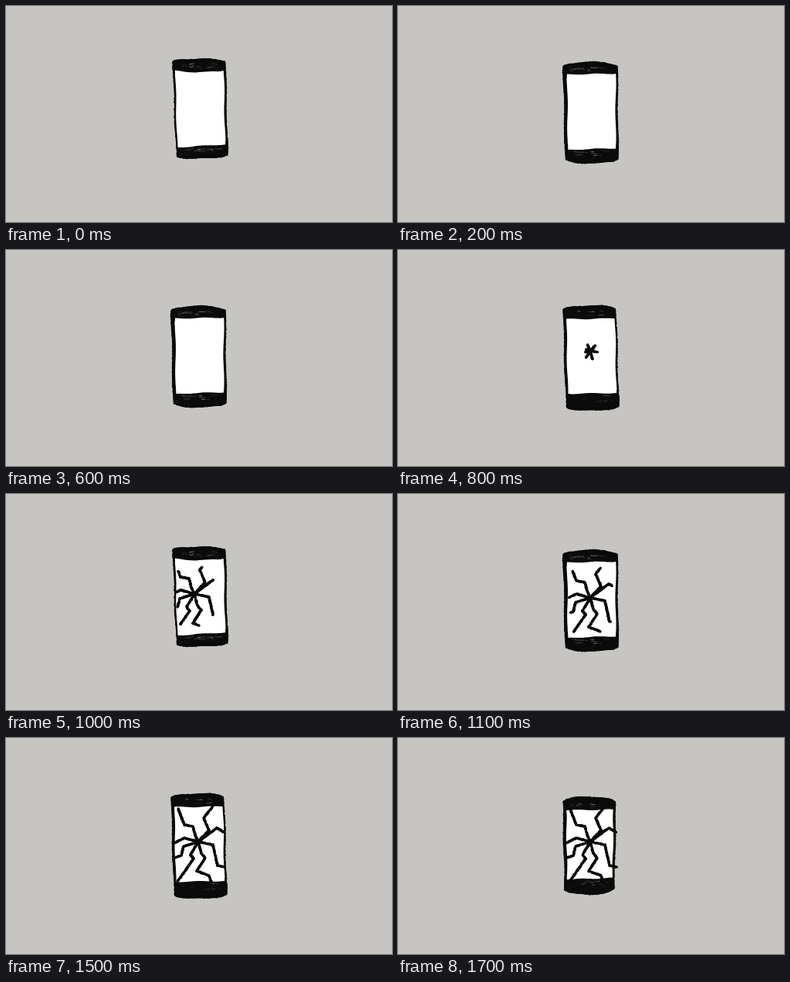
An HTML page with a canvas that plays this animation: 500x281 px, repeating every 1.9 s.

```html
<!DOCTYPE html>
<html lang="en">
<head>
<meta charset="utf-8">
<title>Cracking phone</title>
<style>
html, body { margin: 0; width: 100%; height: 100%; overflow: hidden; background: #c7c5c1; }
canvas { display: block; }
</style>
</head>
<body>
<canvas id="stage" width="500" height="281"></canvas>
<script>
const ctx = document.getElementById('stage').getContext('2d');
const INK = '#0b0b0b', PAPER = '#c7c5c1', LOOP = 1900;

const pts = s => s.split(' ').map(p => p.split(',').map(Number));

// Corners run clockwise from the top left; bulge rounds the two ends
const poses = {
  a: { seed: 11, bulge: 3, dip: 2, wear: 22,
       body: pts('217,73 283,73 286,193 222,195'), screen: pts('219,84 282,84 284,180 222,184') },
  b: { seed: 23, bulge: 4, dip: 0, wear: 7,
       body: pts('215,78 281,77 285,203 219,204'), screen: pts('218,90 281,89 283,186 220,187') },
  c: { seed: 37, bulge: 5, dip: 0, wear: 15,
       body: pts('215,79 283,79 284,198 218,199'), screen: pts('219,89 282,88 282,185 220,187') },
  d: { seed: 53, bulge: 6, dip: 0, wear: 12,
       body: pts('215,83 281,84 279,196 217,197'), screen: pts('218,94 279,93 278,182 219,184') }
};

// Crack paths, relative to the point of impact
const cracks = [
  '-4,-9 -7,-20 -18,-22 -26,-43',
  '14,-15 7,-31 19,-46',
  '24,-18 34,-12',
  '19,4 25,31 35,33',
  '4,15 9,21 -2,38 14,44 17,53',
  '-10,17 -6,22 -27,52',
  '-18,-5 -32,2',
  '-19,6 -22,18 -31,21'
].map(s => pts('0,0 ' + s));

const steps = [
  { at: 0, pose: 'a' },
  { at: 200, pose: 'c' },
  { at: 400, pose: 'a' },
  { at: 600, pose: 'c' },
  { at: 800, pose: 'b', grow: .17, hit: [249, 131] },
  { at: 900, pose: 'd', grow: .45, hit: [247, 132] },
  { at: 1000, pose: 'a', grow: .75, hit: [244, 130] },
  { at: 1100, pose: 'c', grow: .85, hit: [249, 135] },
  { at: 1300, pose: 'c', grow: 1, hit: [249, 135] },
  { at: 1500, pose: 'b', grow: 1, hit: [249, 135] },
  { at: 1700, pose: 'd', grow: 1, hit: [249, 135] }
];

const mix = (a, b, k) => a + (b - a) * k;

function random(seed) {
  let s = seed * 7919;
  return () => (s = (s * 16807) % 2147483647) / 2147483647;
}

// Wavy closed outline; top and bottom edges bow outwards
function outline(corners, top, bottom, seed) {
  const n = 16, bows = [-top, 0, bottom, 0];
  return corners.flatMap((a, i) => {
    const b = corners[(i + 1) % 4];
    return Array.from({ length: n }, (_, j) => {
      const k = j / n, wave = .6 * Math.sin(k * 9 + seed + i);
      return [
        mix(a[0], b[0], k) + (i % 2 ? wave : 0),
        mix(a[1], b[1], k) + bows[i] * Math.sin(Math.PI * k) ** .6 + (i % 2 ? 0 : wave)
      ];
    });
  });
}

function fill(points, color) {
  ctx.fillStyle = color;
  ctx.beginPath();
  points.forEach(p => ctx.lineTo(...p));
  ctx.fill();
}

// Crayon line: closely spaced blots of uneven size
function crayon(points, width, rnd, share = 1) {
  const segs = points.slice(1).map((b, i) => {
    const a = points[i];
    return { a, b, len: Math.hypot(b[0] - a[0], b[1] - a[1]) };
  });
  let left = share * segs.reduce((sum, s) => sum + s.len, 0);
  ctx.fillStyle = INK;
  for (const { a, b, len } of segs) {
    for (let d = 0; d <= Math.min(len, left); d += .8) {
      const x = mix(a[0], b[0], d / len) + (rnd() - .5) * .6;
      const y = mix(a[1], b[1], d / len) + (rnd() - .5) * .6;
      ctx.beginPath();
      ctx.arc(x, y, width / 2 * (.8 + rnd() * .4), 0, Math.PI * 2);
      ctx.fill();
    }
    left -= len;
    if (left <= 0) break;
  }
}

// Pale streaks where the ink is thin
function scratch(from, to, count, rnd) {
  ctx.strokeStyle = PAPER;
  ctx.lineWidth = .8;
  for (let i = 0; i < count; i++) {
    const len = 2 + rnd() * 7;
    const x = mix(from[0] + 5, to[0] - 5 - len, rnd());
    const y = mix(from[1] + 1, to[1] - 3, rnd());
    ctx.globalAlpha = .1 + .5 * rnd() ** 2;
    ctx.beginPath();
    ctx.moveTo(x, y);
    ctx.lineTo(x + len, y + rnd() * 1.6 - .8);
    ctx.stroke();
  }
  ctx.globalAlpha = 1;
}

function draw({ pose, grow, hit }) {
  const { seed, bulge, dip, wear, body, screen } = poses[pose];
  const rnd = random(seed);
  const shell = outline(body, bulge, bulge, seed);
  ctx.fillStyle = PAPER;
  ctx.fillRect(0, 0, 500, 281);
  fill(shell, INK);
  crayon([...shell, shell[0]], 3, rnd);
  fill(outline(screen, -dip, 0, seed), '#fff');
  scratch(body[0], screen[1], wear, rnd);
  scratch(screen[3], body[2], wear, rnd);
  if (!grow) return;
  ctx.save();
  ctx.translate(...hit);
  cracks.forEach(c => crayon(c, 3.4, rnd, grow));
  ctx.restore();
}

const start = performance.now();
let shown;
function tick() {
  const t = (performance.now() - start) % LOOP;
  const step = steps.filter(s => s.at <= t).pop();
  if (step !== shown) draw(shown = step);
  requestAnimationFrame(tick);
}
tick();
</script>
</body>
</html>
```
